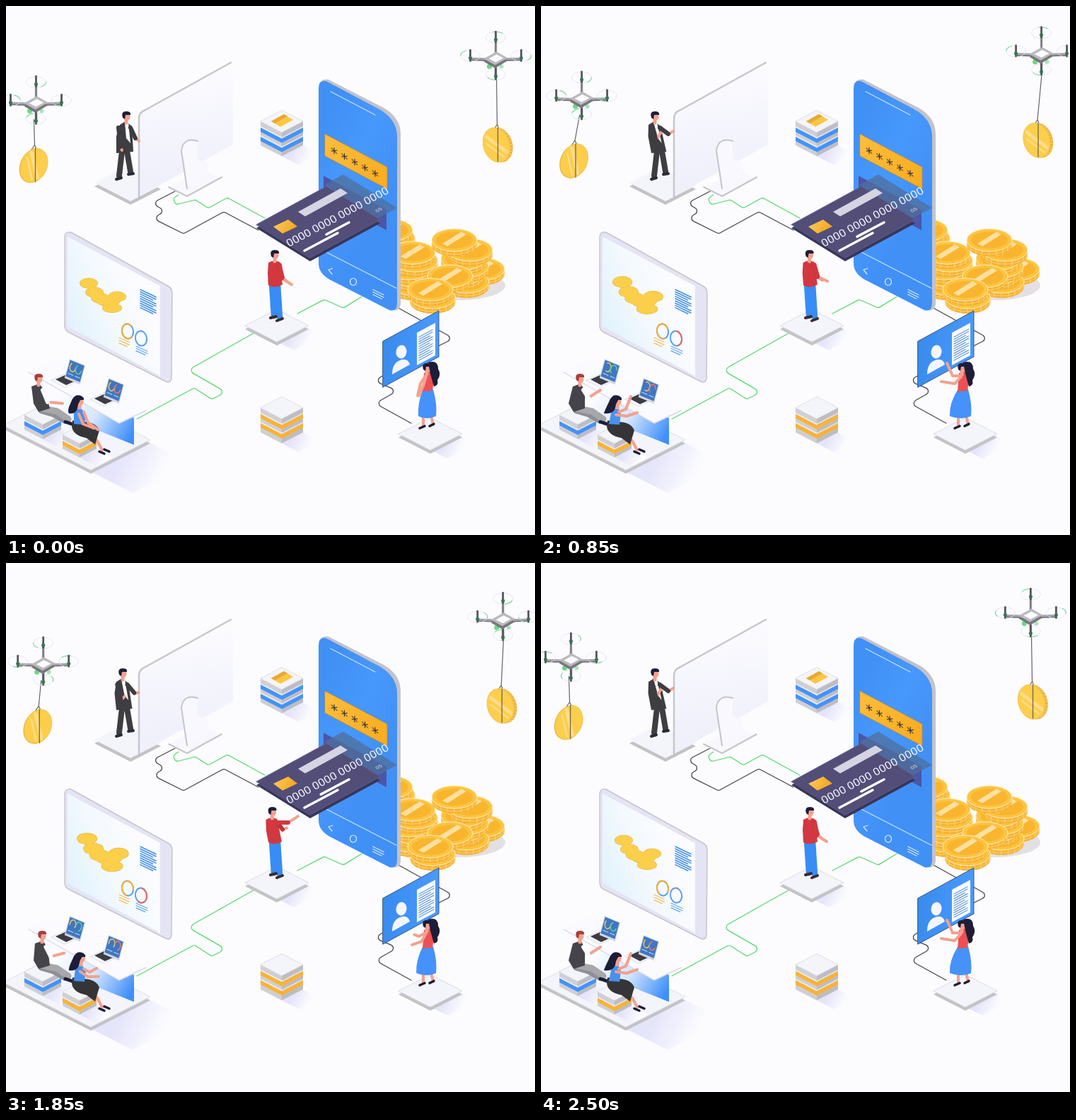
An HTML page with a canvas that plays this animation: 748x748 px, repeating every 2.55 s.

```html
<!DOCTYPE html>
<html lang="en">
<head>
<meta charset="utf-8">
<title>Digital payments</title>
<style>
html, body { margin: 0; width: 100%; height: 100%; overflow: hidden; background: #fcfcff; }
canvas { display: block; width: 748px; height: 748px; }
</style>
</head>
<body>
<canvas id="stage" width="748" height="748"></canvas>
<script>
const ctx = document.getElementById('stage').getContext('2d');
const LOOP = 2550, STEP = 50, CYCLE = 1500, TURN = Math.PI * 2;
const PAPER = '#fcfcff', SKIN = '#f3a18e', NAVY = '#1d1d38', SUIT = '#3d3d42', RED = '#d2383f';
const BLUE = '#4293fc', GOLD = '#fab333', GREEN = '#54d86a', TOP = '#f4f4fb', EDGE = '#c3c3c6';

const mix = (a, b, p) => a + (b - a) * p;
const ease = x => { x = Math.max(0, Math.min(1, x)); return x * x * (3 - 2 * x); };
const pulse = (t, up0, up1, down0, down1) =>
  ease((t - up0) / (up1 - up0)) * (1 - ease((t - down0) / (down1 - down0)));

// Drawing helpers
function gradient(x0, y0, x1, y1, ...colors) {
  const g = ctx.createLinearGradient(x0, y0, x1, y1);
  colors.forEach((c, i) => g.addColorStop(i / (colors.length - 1), c));
  return g;
}
function shape(d, fill, stroke, width = 1) {
  const p = new Path2D(d);
  if (fill) { ctx.fillStyle = fill; ctx.fill(p); }
  if (stroke) { ctx.strokeStyle = stroke; ctx.lineWidth = width; ctx.stroke(p); }
}
const line = (d, color, width = 1) => shape(d, null, color, width);
function oval(x, y, rx, ry, fill, stroke, width = 1, tilt = 0, from = 0, to = TURN) {
  ctx.beginPath();
  ctx.ellipse(x, y, rx, ry, tilt, from, to);
  if (fill) { ctx.fillStyle = fill; ctx.fill(); }
  if (stroke) { ctx.strokeStyle = stroke; ctx.lineWidth = width; ctx.stroke(); }
}
// Upright parallelogram from its top left corner.
function panel(x, y, w, h, slope, fill, stroke, width) {
  shape(`M${x} ${y}l${w} ${w * slope}v${h}l${-w} ${-w * slope}Z`, fill, stroke, width);
}
// Flat parallelogram from its left corner: a goes up right, b goes down right.
function slab(x, y, a, b, fill, up = .51, down = .51, stroke = null) {
  shape(`M${x} ${y}l${a} ${-a * up}l${b} ${b * down}l${-a} ${a * up}Z`, fill, stroke, .8);
}
function transformed(matrix, draw) {
  ctx.save();
  ctx.transform(...matrix);
  draw();
  ctx.restore();
}
function text(value, font, color, matrix, align = 'left') {
  transformed(matrix, () => {
    ctx.font = font;
    ctx.fillStyle = color;
    ctx.textAlign = align;
    ctx.fillText(value, 0, 0);
  });
}
function route(color, ...points) {
  ctx.beginPath();
  ctx.moveTo(...points[0]);
  for (let i = 1; i < points.length - 1; i++) ctx.arcTo(...points[i], ...points[i + 1], 5);
  ctx.lineTo(...points.at(-1));
  ctx.strokeStyle = color;
  ctx.lineWidth = 1.2;
  ctx.stroke();
}
function rows(x, y, width, count, gap, slope, color, weight = 1.2) {
  for (let i = 0; i < count; i++) {
    const w = width * (i % 3 === 2 ? .8 : 1);
    line(`M${x} ${y + i * gap}l${w} ${w * slope}`, color, weight);
  }
}

// Isometric furniture
function shadow(x, y, w, h) {
  slab(x, y, w, h, gradient(x + w / 2, y - w / 4, x + w / 2 + h, y - w / 4 + h / 2, '#e4e4fa', PAPER));
}
function tile(x, y, w) {
  shadow(x, y + w * .5, w - 4, 24);
  slab(x - w, y + 5, w, w, EDGE);
  slab(x - w, y, w, w, TOP, .51, .51, '#d5d5de');
}
function cube(x, y, w, height, stripe, stripes) {
  const sides = (from, to, left, right) => {
    panel(x - w, y + from, w, to - from, .52, left);
    panel(x, y + w * .52 + from, w, to - from, -.52, right);
  };
  shadow(x, y + w * .52 + height, w, 24);
  sides(0, height, '#cfcfd4', '#bdbdc3');
  for (let i = 0; i < stripes; i++) {
    const at = 9 + i * 13;
    sides(at - 2, at, '#efeff7', '#e4e4ec');
    sides(at, at + 6, stripe, stripe);
  }
  slab(x - w, y, w, w, TOP, .52, .52, '#d8d8de');
}

function wires() {
  route(GREEN, [244, 267], [236, 272], [240, 281], [268, 274], [286, 286], [313, 271], [366, 300]);
  route('#444', [239, 262], [206, 279], [226, 290], [207, 300], [251, 322], [308, 291], [357, 317]);
  route(GREEN, [503, 411], [477, 427], [450, 415], [412, 435]);
  route(GREEN, [353, 461], [257, 515], [311, 546], [291, 556], [266, 540], [185, 584]);
  route('#444', [553, 426], [633, 470], [605, 484]);
  route('#444', [536, 521], [520, 530], [554, 544], [522, 562], [573, 590]);
}

function backMonitor() {
  slab(125, 255, 43, 51, EDGE);
  slab(125, 250, 43, 51, TOP);
  shape('M189 160Q189 151 197 147L321 80V196L189 269Z', gradient(250, 90, 270, 240, PAPER, '#f5f5fd', '#f0f0fb'));
  slab(230, 256, 49, 26, '#f7f7fd');
  shape('M271 191Q250 185 248 205L256 258L285 241V222L271 216Z', '#f8f8fe');
  line('M271 191Q250 185 248 205L256 258M230 256L256 269L305 242', '#c5c5ca', 2);
  line('M188 269V160Q188 150 197 147L318 80', '#c6c6cb', 2.5);
}

function flatCoin(x, y) {
  const r = 32, ry = 16;
  shape(`M${x - r} ${y}A${r} ${ry} 0 0 1 ${x + r} ${y}v7A${r} ${ry} 0 0 1 ${x - r} ${y + 7}Z`, '#f7b132');
  oval(x, y + 4, r, ry, null, '#fcd478', 1, 0, .15, 2.9);
  for (let a = .3; a < 2.9; a += .32)
    line(`M${x + r * Math.cos(a)} ${y + ry * Math.sin(a)}v6`, '#fccb62', 1.5);
  oval(x, y, r, ry, '#fcc53f', '#fff0cc', 1);
  oval(x, y, r - 6, ry - 4, '#fab52e');
  slab(x - 17, y + 5, 27, 7, '#fee0a0', .62, .55);
}
function coinStack(x, y, count) {
  for (let i = count - 1; i >= 0; i--) flatCoin(x + 5 * Math.sin(i * 2.4), y + i * 11);
}
function coinPile() {
  oval(642, 395, 64, 21, '#e3e0e4');
  coinStack(543, 317, 3);
  coinStack(575, 349, 5);
  coinStack(673, 372, 1);
  coinStack(647, 357, 4);
  coinStack(656, 345, 1);
  coinStack(634, 331, 1);
  coinStack(628, 382, 1);
  coinStack(600, 401, 2);
}

function phone(t) {
  shape('M443 112Q445 102 456 104L534 144Q558 158 558 181V422Q556 432 548 430Z', '#c2c2cc');
  shape('M442 117Q442 103 454 107L526 145Q552 159 553 183V420Q553 433 542 430L458 387Q442 378 442 364Z',
    gradient(442, 180, 553, 240, '#4090f5', '#4798fd', '#4190f6'));
  line('M459 121L522 154M443 343L552 399', '#c9e2ff', 1.2);
  line('M462 371L456 373L461 379', '#d8e9ff', 1.2);
  rows(519, 401, 15, 3, 3.5, .5, '#d8e9ff');
  oval(491, 390, 4.5, 5, null, '#e4f0ff', 1.2);
  panel(451, 181, 88, 31, .53, gradient(451, 190, 539, 250, '#fcbc3a', '#f9ac20'), '#b98b3b', .8);
  for (let i = 0; i < 5; i++) {
    const swell = Math.max(0, Math.cos((t - 225 - 110 * i) / 875 * TURN)) ** 6;
    const size = 20 * (1 + .25 * swell);
    text('*', `${size}px "DejaVu Sans", sans-serif`, '#333344',
      [1, .45, 0, 1, 464 + i * 14.5, 205 + i * 8 + size * .5], 'center');
  }
}

function bankCard(wave) {
  panel(449, 240, 89, 29, .54, '#4b56a6');
  slab(450, 253, 27, 76, 'rgba(79,111,155,.75)', .545, .62);
  slab(354, 314, 99, 76, '#38365a', .545, .62);
  slab(354, 309, 99, 76, '#524e78', .545, .62, '#686490');
  slab(378, 312, 21, 13, gradient(380, 304, 408, 320, '#fccb56', '#f5a31f'), .48, .75);
  slab(413, 291, 60, 10, '#d5d5e2', .55, .65);
  text('0000 0000 0000 0000', '17px Roboto, sans-serif', '#f2f2fa', [.86, -.465, .45, .75, 400, 341]);
  text('05', '8px Roboto, sans-serif', '#e2e8f5', [.88, -.475, .64, .55, 525, 292]);
  const length = 32 + 8 * wave;
  line(`M422 346l47 -25M485 306l${-length} ${length * .53}`, '#fff', 3.5);
}

function ring(x, y, color, share, from) {
  oval(x, y, 8, 10.5, null, '#579ff9', 2, -.2);
  oval(x, y, 8, 10.5, null, color, 2, -.2, from, from + TURN * share);
}
function wallScreen(t, wave) {
  shape('M83 328Q83 318 92 320L229 396Q235 399 235 406L234 526Q233 534 226 531L88 461Q83 458 83 452Z',
    '#e4e4f4', '#c6c6cd', 1.5);
  panel(87, 326, 130, 127, .535, gradient(90, 440, 190, 400, '#e3f3fc', '#f3f9fe', PAPER));
  line('M217 396V523', '#f8f8ff', 2);
  const grow = 1 + .12 * wave;
  const blobs = inset => {
    for (let u = 0; u <= 1; u += .2)
      oval(138 + (40 * u - 21) * grow, 411 + (75 * u - 56 * u * u - 19) * grow,
        13 * grow - inset, 7.5 * grow - inset, inset ? '#fccf4b' : '#e9bb4c');
    oval(150, 411 + 16 * grow, 14 * grow - inset, 7 * grow - inset, inset ? '#fccf4b' : '#e9bb4c');
  };
  blobs(0);
  blobs(.8);
  rows(190, 401, 22, 9, 3.2, .48, '#448fe7', 1.6);
  ring(172, 460, '#f5ad31', .72, 1 + t / LOOP * 1.5);
  ring(191, 470, '#ef6558', .58 * wave, -1.2);
  rows(160, 469, 14, 3, 3.8, .45, '#f3bd57');
  rows(184, 481, 16, 3, 3.3, .45, '#5ea5f0');
}

function laptop(x, y, t, color) {
  slab(x - 20, y + 1, 21, 19, '#f5f5fc', .45, .53, '#d8d8e2');
  slab(x - 14, y, 14, 15, '#3c3c45', .45, .53);
  transformed([1, .42, -.27, 1, x + 6, y - 29], () => {
    ctx.fillStyle = '#d5d5df';
    ctx.fillRect(0, 0, 22, 27);
    ctx.fillStyle = '#3f77c2';
    ctx.fillRect(1, 1, 20, 23);
    const spin = t / LOOP * 2 * TURN;
    oval(7, 9, 4, 6, null, '#f2c75a', 1.4, 0, spin, spin + 4);
    oval(15, 9, 4, 6, null, color, 1.4, 0, -spin, 4 - spin);
    line('M3 19h7m3 0h6', '#bce0ff');
  });
}

// Each joint is [restX, restY, raisedX, raisedY].
function limb(color, width, pose, ...joints) {
  const at = ([x, y, x2 = x, y2 = y]) => `${mix(x, x2, pose)} ${mix(y, y2, pose)}`;
  line('M' + joints.map(at).join('L'), color, width);
}
function arm(sleeve, width, pose, shoulder, elbow, hand) {
  limb(SKIN, 4, pose, elbow, hand);
  limb(sleeve, width, pose, shoulder, elbow);
}
function head(x, y, hair) {
  transformed([1, 0, 0, 1, x, y], () => {
    line('M-1 2v7', SKIN, 5);
    oval(0, 0, 4.6, 6, SKIN);
    shape('M-6 2Q-9 -7 -1 -7Q6 -7 5 -2L-2 -2L-3 4Z', hair);
  });
}

function seatedMan(pose) {
  const dx = 9 * pose;
  limb('#8f8f97', 7, pose, [50, 573], [67, 578], [83, 587]);
  limb('#a7a7ac', 9, pose, [51, 569], [72, 573], [88, 584]);
  line('M84 588l9 3', NAVY, 5);
  shape(`M${36 + dx} 538L${47 + dx} 534L${55 + dx * .8} 544L62 569L46 574L39 562Z`, '#44444a');
  arm('#fafaff', 6, pose, [52, 543, 60, 543], [59, 560, 67, 554], [80, 562, 84, 543]);
  head(47 + dx, 527, '#a83f3d');
}
function seatedWoman(pose) {
  const dx = 4 * pose;
  limb(SKIN, 4, pose, [118, 603], [129, 615], [136, 628]);
  line('M132 630l7 3M139 627l7 3', NAVY, 3.5);
  shape('M94 586L109 588Q127 588 132 600L126 620L114 611Q94 607 93 594Z', '#353538');
  shape(`M${96 + dx} 571L${105 + dx} 568L113 577L111 592L96 591Z`, '#4791ed');
  head(105 + dx, 559, NAVY);
  shape(`M${108 + dx} 552Q${97 + dx} 546 ${92 + dx} 560Q${86 + dx} 572 89 576Q${101 + dx} 578 ${102 + dx} 563Z`, NAVY);
  arm(SKIN, 4, pose, [110, 574], [116, 589, 120, 570], [130, 599, 127, 552]);
  arm(SKIN, 4, pose, [103, 577, 106, 578], [109, 591, 121, 580], [124, 597, 136, 575]);
}
function office(t, pose) {
  shadow(119, 658, 82, 60);
  slab(-4, 598, 84, 124, EDGE);
  slab(-4, 593, 84, 124, TOP, .51, .51, '#d8d8df');
  panel(62, 535, 119, 38, .4, gradient(80, 545, 181, 600, PAPER, '#d4e6ff', '#3f8ffa'));
  slab(32, 517, 38, 128, '#fafaff', .47, .57);
  line('M32 518L160 590L198 572', '#d8d8e6', 1.4);
  laptop(84, 528, t, '#63cba2');
  laptop(139, 555, t, '#f1786a');
  cube(52, 578, 26, 21, BLUE, 1);
  cube(104, 606, 24, 20, GOLD, 1);
  seatedMan(pose);
  seatedWoman(pose);
}

function suitMan(pose) {
  const dx = -9 * pose;
  line('M164 205L160 240M171 205L176 234', SUIT, 8);
  line('M156 245l7 -2M173 238l7 -1', '#292a36', 4);
  shape(`M${161 + dx} 168L${169 + dx} 163L${178 + dx} 170L${180 + dx * .3} 206L156 208L${156 + dx * .5} 184Z`, SUIT);
  shape(`M${168 + dx} 164L${173 + dx} 165L${176 + dx * .6} 194L${170 + dx * .5} 187Z`, '#fff');
  arm(SUIT, 6, pose, [159, 172, 156, 172], [162, 199, 163, 190], [164, 204, 171, 176]);
  arm(SUIT, 6, pose, [176, 172, 168, 172], [183, 187, 180, 181], [188, 191, 187, 177]);
  head(171 + dx, 156, NAVY);
}
function redMan(reach) {
  const dx = -4 * reach;
  line('M376 393L379 438M384 393L387 440', '#388cf5', 8.5);
  line('M374 441l8 -2M383 445l8 -3', '#3c2c2f', 4);
  shape(`M${371 + dx} 363Q${378 + dx} 358 ${387 + dx} 362L${391 + dx * .3} 394Q381 400 371 395L${370 + dx * .6} 378Z`, RED);
  arm('#c52f3a', 6, reach, [386, 366, 385, 369], [391, 384, 391, 376], [398, 390, 397, 373]);
  arm(RED, 6, reach, [387, 366, 384, 367], [390, 385, 400, 365], [404, 394, 414, 354]);
  head(381 + dx, 352, NAVY);
}
function presenter(pose) {
  line('M590 579V594M601 579L604 592', SKIN, 4);
  line('M585 597l7 -3M599 594l6 -3', NAVY, 3.5);
  const hem = 583 - 5 * pose;
  shape(`M589 543L604 542Q610 564 608 580Q595 586 ${hem} 580Q${hem - 1} 562 589 543Z`, '#4592fb');
  shape('M591 519L602 516L606 524L603 544L589 545Z', '#ed4f53');
  head(596, 512, NAVY);
  shape('M597 504Q611 500 611 513Q616 521 610 529Q612 537 605 538L600 520Z', NAVY);
  arm(SKIN, 4, pose, [593, 523], [586, 534, 582, 523], [582, 551, 574, 505]);
  arm(SKIN, 4, pose, [594, 524], [590, 537, 585, 534], [584, 551, 566, 531]);
}
function profilePane(wave) {
  panel(533, 474, 79, 65, -.545, gradient(533, 480, 612, 490, '#388bed', '#4a9bff'), '#3a547c', 1);
  oval(559, 489, 7.5, 9.5, '#f4f6ff', null, 1, .15);
  shape('M546 521Q546 505 557 501Q568 497 571 507Z', '#f4f6ff');
  panel(581, 462, 26, 46, -.54, '#fafaff');
  rows(584, 468, 19 + 2 * wave, 11, 3.3, -.54, '#659bd9');
}

function drone(x, y, t) {
  const rotor = i => [36 * Math.sin(i * TURN / 4), -5 - 26 * Math.cos(i * TURN / 4)];
  transformed([1, 0, 0, 1, x, y], () => {
    for (let i = 0; i < 4; i++) {
      const [rx, ry] = rotor(i), turn = t / LOOP * 6 * TURN + i * 1.7;
      line(`M0 0L${rx} ${ry + 4}`, '#a5a5aa', 3.6);
      line(`M0 2L${rx} ${ry + 6}`, '#66666c', 1.3);
      oval(rx, ry, 14, 8, null, '#e2e2f3', .9);
      oval(rx, ry, 14, 8, null, '#7cd796', 1.1, 0, turn, turn + 1);
      line(`M${rx} ${ry - 8}v15`, '#55555b', 2.8);
      oval(rx, ry + 3, 2.5, 2.5, '#35784f');
    }
    oval(-9, 10, 3.5, 3.5, '#68da83');
    oval(8, 10, 3, 3, '#a8e4b7');
    slab(-17, 3, 18, 16, '#77777d', .6, .6);
    slab(-17, -1, 18, 16, '#bbbbbf', .56, .56);
    slab(-10, -1, 11, 10, PAPER, .54, .5);
  });
}
function hangingCoin(x, y, tilt, edge, fromX, fromY) {
  line(`M${fromX} ${fromY}L${x + 1} ${y - 29}l-6 9m6 -9l4 9`, '#626268', 1.2);
  transformed([Math.cos(tilt), Math.sin(tilt), -Math.sin(tilt), Math.cos(tilt), x, y], () => {
    oval(edge, 1, 18.5, 25, '#eeb240');
    for (let a = -1.2; edge > 1 && a < 1.3; a += .2)
      line(`M${18 * Math.cos(a)} ${25 * Math.sin(a)}l${edge} 1`, '#fbd277');
    oval(0, 0, 18.5, 25, '#fcce4c', '#f3c04b', .8);
    line('M-10 -15L11 14', '#fddd88', 5);
    line('M-13 -6L5 19', '#fddd88', 2.5);
  });
  line(`M${x + 2} ${y - 24}v47`, '#75664a', 1.3);
}
function drones(t) {
  const a = t / LOOP * TURN;
  const x = 51.5 - 7 * Math.cos(a) - 2 * Math.cos(2 * a) + 1.8 * Math.sin(a);
  const y = 138.5 - 5 * Math.sin(a) + 2.5 * Math.sin(2 * a);
  const coinX = 44.5 - 5 * Math.cos(a);
  hangingCoin(coinX, y + 87, .4, -1, x - 3, y + 22);
  hangingCoin(coinX + 654, y + 58, -.3, 4, x + 651, y - 41);
  drone(x, y, t);
  drone(x + 650, y - 63, t + 300);
}

function draw(t) {
  const phase = t % CYCLE;
  const pose = pulse(phase, 200, 480, 1000, 1320);
  const reach = pulse(phase, 150, 400, 560, 930);
  const wave = (1 - Math.cos(2 * TURN * t / LOOP)) / 2;
  ctx.fillStyle = PAPER;
  ctx.fillRect(0, 0, 748, 748);
  wires();
  backMonitor();
  suitMan(pose);
  cube(390, 163, 30, 34, BLUE, 2);
  slab(375, 163, 18, 13, '#fbc743', .55, .6);
  slab(375, 163, 18, 5, '#e9a833', .55, .6);
  cube(390, 568, 30, 35, GOLD, 2);
  coinPile();
  phone(t);
  bankCard(wave);
  tile(383, 452, 45);
  redMan(reach);
  wallScreen(t, wave);
  office(t, pose);
  tile(600, 605, 45);
  profilePane(wave);
  presenter(pose);
  drones(t);
}

ctx.lineCap = ctx.lineJoin = 'round';
let begin;
function frame(now) {
  begin ??= now;
  draw(Math.floor((now - begin) % LOOP / STEP) * STEP);
  requestAnimationFrame(frame);
}
requestAnimationFrame(frame);
</script>
</body>
</html>
```
